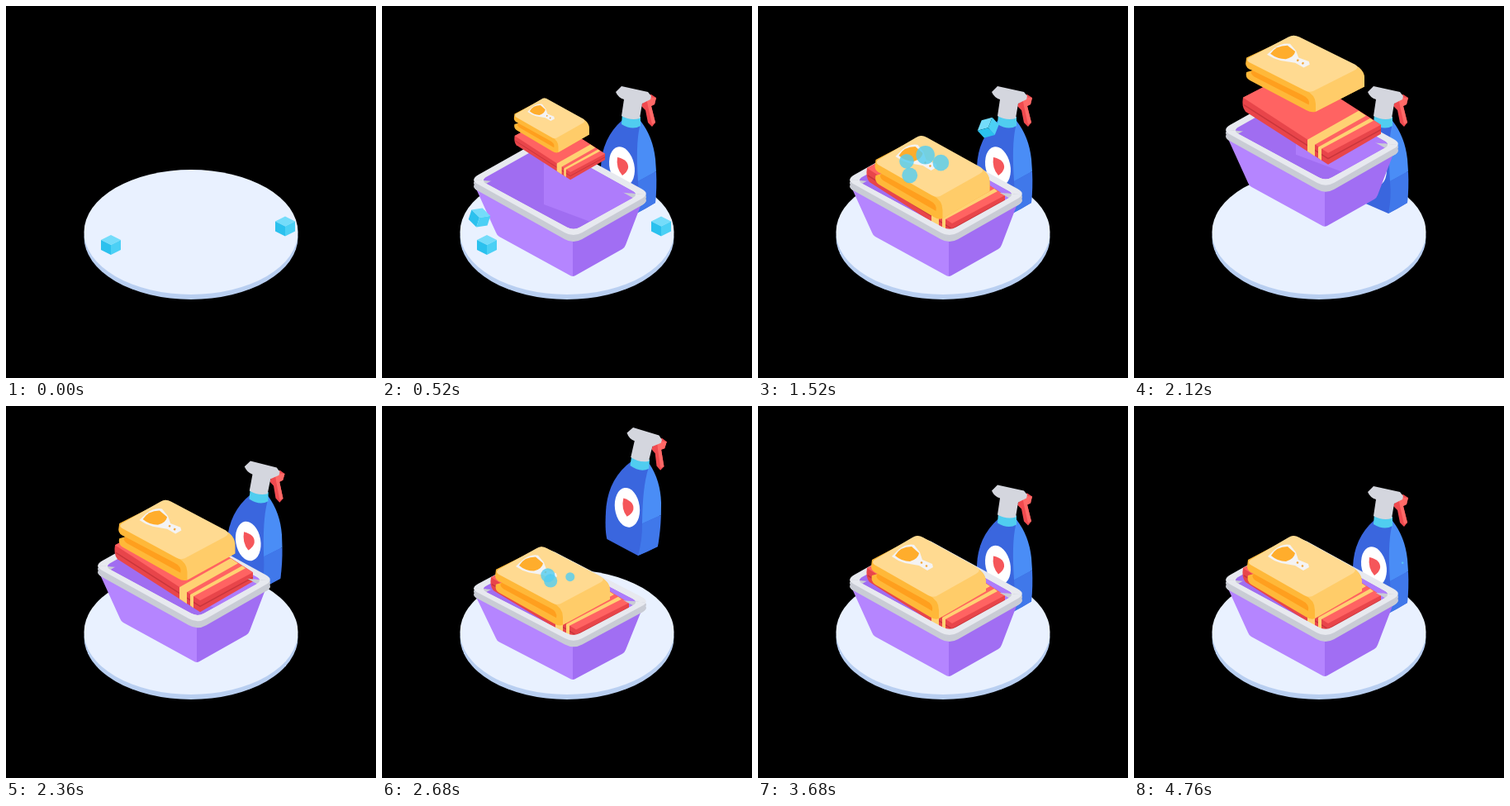
Recreate the animation shown at these times as an HTML page. Size 448 by 450 pixels, loop 4800 ms.

```html
<!DOCTYPE html>
<html lang="en">
<head>
<meta charset="utf-8">
<title>Laundry</title>
<style>
  html, body { margin: 0; width: 100%; height: 100%; overflow: hidden; background: #000; }
  svg { display: block; width: 100%; height: 100%; }
</style>
</head>
<body>
<svg viewBox="0 0 448 450" xmlns="http://www.w3.org/2000/svg">
  <defs>
    <path id="rim"/>
    <path id="hole"/>
    <path id="ring" fill-rule="evenodd"/>
    <clipPath id="inside"><use href="#hole"/></clipPath>
    <clipPath id="front"><path d="M100 209L340 230V310H100Z"/></clipPath>
    <g id="cube">
      <path fill="#74dcfa" d="M0-12L12-6L0 0L-12-6Z"/>
      <path fill="#2bc1ee" d="M-12-6L0 0V12L-12 6Z"/>
      <path fill="#4bd0f5" d="M12-6L0 0V12L12 6Z"/>
    </g>
  </defs>

  <ellipse cx="224" cy="279.5" rx="129.5" ry="75.5" fill="#b9cff1"/>
  <ellipse cx="224" cy="273.5" rx="129.5" ry="75.5" fill="#e9f1ff"/>

  <g id="bottle">
    <path fill="#3a66de" d="M291 138Q266 160 265 195Q265 222 269 234L308 251Q320 245 331 238Q334 180 313 139Z"/>
    <path fill="#4a8df6" d="M313 139Q328 158 331 185L332 200L310 212Q307 168 312 146Z"/>
    <path fill="#4078ea" d="M310 212L332 200Q333 220 331 238L308 251Q312 232 310 212Z"/>
    <path fill="#50cdf0" d="M291 130L313 134V145Q303 151 290 143Z"/>
    <path fill="#f04a4f" d="M319 109L326 107L332 111L330 119L326 121L331 141L327 146L322 141L319 126L314 121Z"/>
    <path fill="#ff6967" d="M320 110L332 111L330 119L326 121L331 141L327 143L322 121Z"/>
    <path fill="#d4d6de" d="M283 104L290 97L322 104L326 109L325 113L315 118L312 136Q301 139 290 133L293 113Q286 111 283 104Z"/>
    <ellipse cx="290.5" cy="194" rx="15" ry="24" fill="#fff" transform="rotate(-12 290.5 194)"/>
    <path fill="#f5565a" d="M285 183Q299 186 298 196Q297 201 291 205Q283 196 285 183Z"/>
  </g>

  <g id="tub">
    <use href="#rim" y="8" fill="#c9ccd5"/>
    <use href="#rim" y="4" fill="#c9ccd5"/>
    <use href="#rim" fill="#e7e9ef"/>
    <use href="#hole" fill="#a06df1"/>
    <path clip-path="url(#inside)" fill="#ae7cfb" d="M196 150H330V290L196 240Z"/>

    <g id="red">
      <path fill="#e8454a" d="M132 196L196 163L299 229V240L235 277L135 213Q130 207 132 196Z"/>
      <path fill="#ff6362" d="M132 196L196 163L299 229L235 263Z"/>
      <path fill="none" stroke="#c9353b" stroke-width="1.5" d="M133 205L235 270L299 235"/>
      <path fill="#ffd173" d="M210 247L272 212L281 218L219 253V267L210 261Z"/>
      <path fill="#ffd173" d="M223 256L286 221L290 224L227 258V272L223 269Z"/>
    </g>

    <g id="yellow">
      <path fill="#ffb839" d="M138 186L193 157L266 197Q276 203 276 213V224L219 257Q214 259 208 255L142 216Q136 212 138 205L145 203Q137 200 137 194Z"/>
      <path fill="#ff9f1e" d="M145 203L203 235Q213 240 211 248L147 211Q141 206 145 203Z"/>
      <path fill="#ffcc69" d="M207 229Q219 235 219 247V257L276 224V211Q275 201 264 195Z"/>
      <path fill="#ffda91" d="M141 186L187 159Q193 155 200 159L265 195Q271 199 264 203L216 230Q211 232 206 229L141 192Q137 189 141 186Z"/>
      <path fill="#f4f3f4" d="M162 182L170 174Q180 166 189 168L196 177L199 186L211 191L212 195L205 199L195 193L178 190L170 187Z"/>
      <path fill="#ffad2c" d="M166 181Q172 170 186 170L195 178Q194 185 184 188Q174 188 166 181Z"/>
      <path stroke="#f2a63a" stroke-width="2.5" d="M197 189l2 1M203 193l2 1"/>
    </g>

    <path fill="#b585ff" d="M113 219L231 280V327Q229 327 226 325L142 279Q139 277 138 274Z"/>
    <path fill="#a16ef3" d="M231 280L316 234L295 289Q294 292 291 294L236 325Q233 327 231 327Z"/>
    <g clip-path="url(#front)">
      <use href="#ring" y="8" fill="#c9ccd5"/>
      <use href="#ring" y="4" fill="#c9ccd5"/>
      <use href="#ring" fill="#e7e9ef"/>
    </g>
  </g>
  <g id="cubes"></g>
  <g id="bubbles" fill="#55cdf0" fill-opacity=".82"></g>
</svg>

<script>
const LOOP = 4800;
const $ = id => document.getElementById(id);
const span = (t, a, b) => Math.min(1, Math.max(0, (t - a) / (b - a)));
const smooth = u => u * u * (3 - 2 * u);
const backOut = u => 1 + 2.2 * (u - 1) ** 3 + 1.2 * (u - 1) ** 2;
const hop = (t, a, b) => Math.sin(Math.PI * span(t, a, b));
const mix = (a, b, u) => a + (b - a) * u;

// Closed outline whose corners are cut and curved
function rounded(points, cut) {
  const toward = ([x, y], [px, py]) => {
    const k = cut / Math.hypot(px - x, py - y);
    return [mix(x, px, k), mix(y, py, k)];
  };
  const n = points.length;
  return points.map((p, i) =>
    `${i ? "L" : "M"}${toward(p, points[(i + n - 1) % n])}Q${p} ${toward(p, points[(i + 1) % n])}`
  ).join("") + "Z";
}
const rim = rounded([[106, 210], [199, 158], [325, 227], [232, 280]], 12);
const hole = rounded([[119, 211], [199, 166], [311, 228], [232, 272]], 9);
$("rim").setAttribute("d", rim);
$("hole").setAttribute("d", hole);
$("ring").setAttribute("d", rim + hole);

let seed = 11;
const random = () => (seed = seed * 16807 % 2147483647) / 2147483647;
const around = (center, spread) => center + (random() * 2 - 1) * spread;

function add(parent, tag) {
  return parent.appendChild(document.createElementNS("http://www.w3.org/2000/svg", tag));
}

// Cubes swing outwards, then arc over the rim into the tub
const cubes = [
  { x: 118, y: 256, side: -1, angle: 18, life: 480 },
  { x: 127, y: 289, side: -1, angle: 0, life: 500 },
  { x: 338, y: 266.5, side: 1, angle: 0, life: 690 }
].map(c => {
  const node = add($("cubes"), "use");
  node.setAttribute("href", "#cube");
  const path = [[c.x, c.y], [c.x + c.side * 38, c.y - 60], [224 + c.side * 110, 65], [224 + c.side * 10, 188]];
  return { ...c, node, path };
});

// Foam over the clothes twice, then a loose drift around the scene
const bursts = [
  { start: 1370, count: 4, x: 220, y: 190, wide: 40, high: 20, size: 10, life: 300, gap: 10, drift: 0.1 },
  { start: 2540, count: 3, x: 215, y: 204, wide: 20, high: 4, size: 8, life: 320, gap: 20, drift: 0.2 },
  { start: 3840, count: 9, x: 250, y: 175, wide: 110, high: 40, size: 7, life: 480, gap: 57, drift: 0.3 }
];
const bubbles = bursts.flatMap(b => Array.from({ length: b.count }, (_, i) => {
  const x = around(b.x, b.wide);
  return {
    node: add($("bubbles"), "circle"), x, y: around(b.y, b.high), r: around(b.size, 3),
    dx: (x - b.x) * b.drift, dy: -150 * b.drift, start: b.start + i * b.gap, life: b.life
  };
}));

const place = (node, transform) => node.setAttribute("transform", transform);
const scaleAt = (x, y, sx, sy = sx) => `translate(${x} ${y}) scale(${sx} ${sy}) translate(${-x} ${-y})`;

function bezier(path, u) {
  const v = 1 - u, w = [v * v * v, 3 * v * v * u, 3 * v * u * u, u * u * u];
  return [0, 1].map(axis => path.reduce((sum, p, i) => sum + p[axis] * w[i], 0));
}

function draw(t) {
  const pop = backOut(span(t, 40, 480));
  const squash = hop(t, 2420, 2920);
  const tubY = 4 * squash - 2.5 * hop(t, 800, 1160) - 61 * hop(t, 1760, 2420);
  place($("tub"), `translate(0 ${tubY}) ` + scaleAt(224, 327, pop, pop * (1 - 0.055 * squash)));

  const air = hop(t, 1760, 2460);
  const grow = smooth(span(t, 400, 600));
  const drop = 46 * (1 - smooth(span(t, 500, 820)));
  place($("red"), `translate(0 ${-drop - 25 * air}) ` + scaleAt(215, 215, grow));
  place($("yellow"), `translate(${4.5 * (1 - smooth(span(t, 1720, 2060)))} ${-drop - 61 * air}) ` +
    scaleAt(190, 157, grow * (1 + 0.035 * air), grow * (1 - 0.08 * air)));

  const flight = hop(t, 2240, 3100);
  const rebound = 3 * hop(t, 3100, 3340) + 1.5 * hop(t, 3440, 3900);
  place($("bottle"), `translate(${2 * flight} ${-70 * flight - rebound}) rotate(${4.5 * flight} 308 250) ` +
    scaleAt(300, 250, smooth(span(t, 60, 520))));

  cubes.forEach((c, i) => {
    const u = span(t, 945, 945 + c.life), [x, y] = bezier(c.path, u);
    const size = (1 - span(u, 0.86, 1)) * (i ? 1 : smooth(span(t, 40, 400)));
    place(c.node, `translate(${x} ${y}) rotate(${c.angle - c.side * 50 * u}) scale(${size})`);
  });

  bubbles.forEach(b => {
    const u = span(t, b.start, b.start + b.life);
    b.node.setAttribute("cx", b.x + b.dx * (u - 0.5));
    b.node.setAttribute("cy", b.y + b.dy * (u - 0.5));
    b.node.setAttribute("r", b.r * Math.min(1, 3 * u, 5 * (1 - u)));
  });
}

function loop() {
  draw(performance.now() % LOOP);
  requestAnimationFrame(loop);
}
draw(0);
requestAnimationFrame(loop);
</script>
</body>
</html>
```
